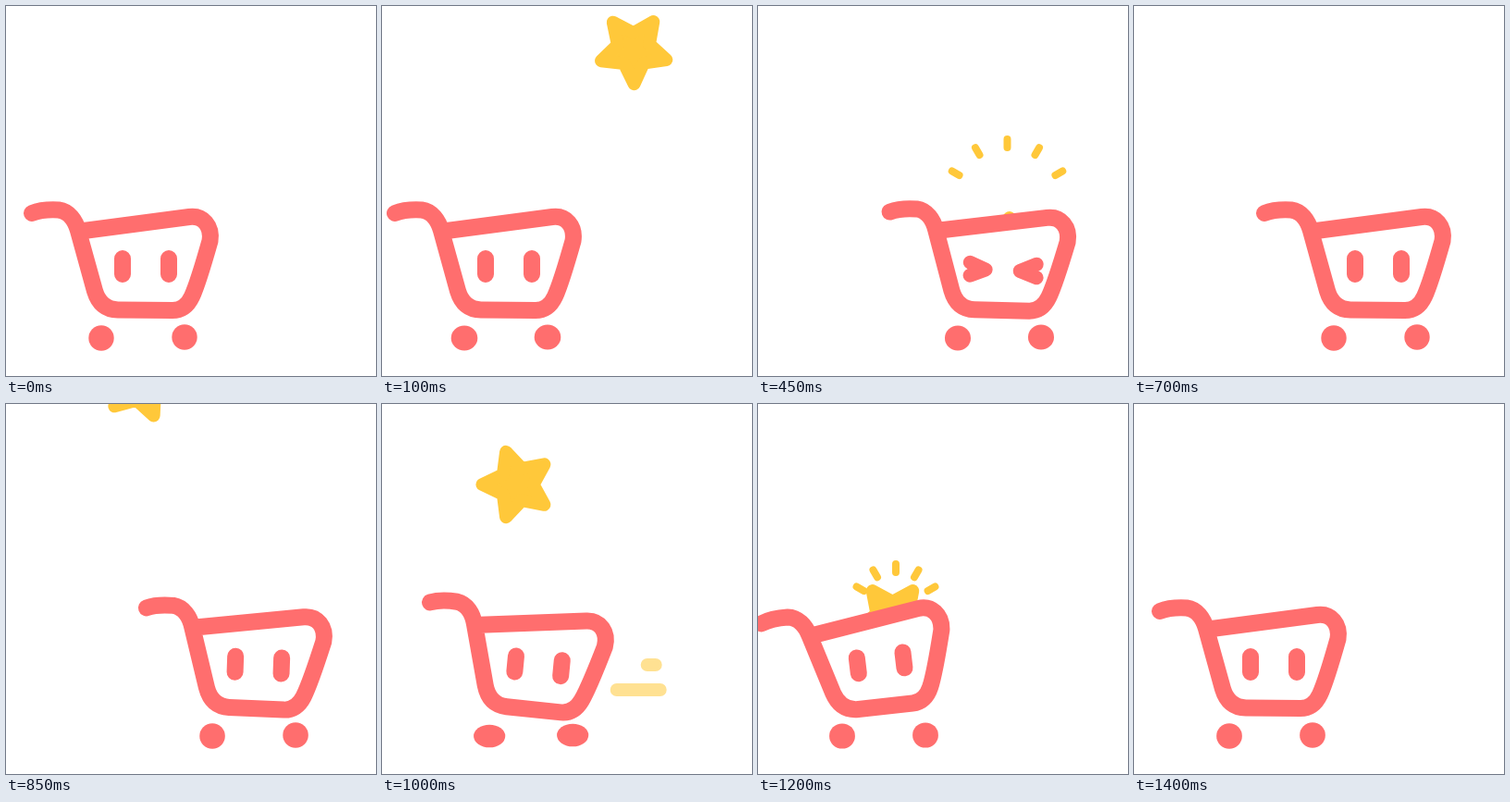
An HTML page that plays this animation: 400 by 400 pixels, repeating every 1.55 s.

```html
<!DOCTYPE html>
<html lang="en">
<head>
<meta charset="utf-8">
<title>Shopping cart</title>
<style>
  html, body { margin: 0; width: 100%; height: 100%; overflow: hidden; background: #fff; }
  svg { display: block; width: 100vw; height: 100vh; }
  .line { fill: none; stroke: #ff6e6e; stroke-width: 18; stroke-linecap: round; stroke-linejoin: round; }
  .squint { stroke-width: 15; }
  .wheel { fill: #ff6e6e; }
  .gold { fill: none; stroke: #ffc83a; stroke-width: 14; stroke-linecap: round; stroke-linejoin: round; }
  #star { fill: #ffc83a; }
  #rays { stroke-width: 8; }
</style>
</head>
<body>
<svg viewBox="0 0 400 400">
  <path id="rays" class="gold"/>
  <path id="trail" class="gold"/>
  <path id="star" class="gold"/>
  <g id="cart">
    <ellipse class="wheel" cx="103" cy="359"/>
    <ellipse class="wheel" cx="193" cy="358"/>
    <g id="body">
      <path fill="#fff" d="M78 243L96 308Q102 328 121 328.5L180 329Q194 329 201 314L220 254Q222 227 198 228Z"/>
      <path class="line" d="M28 224C38 220 48 220 57 220.5C68 222 75 232 78 243L96 308Q102 328 121 328.5L180 329Q194 329 201 314C207 301 214 277 220.5 254C223 238 213 226 198 228L84 243"/>
      <path id="open" class="line" d="M126 273V290M176 273V290"/>
      <path id="shut" class="line squint" d="M115.5 277.5L132.5 285L115.5 291.5M187.5 278.5L169.5 286L187.5 293"/>
    </g>
  </g>
</svg>
<script>
  const LOOP = 1550, STEP = 50, TURN = 700;
  const $ = id => document.getElementById(id);
  const wheels = document.querySelectorAll('.wheel');
  const clamp = v => Math.max(0, Math.min(1, v));
  const show = (id, on) => { $(id).style.display = on ? '' : 'none'; };

  // Swings from pose to pose, each a [time, value] pair, with a sine ease.
  const swing = (poses, t) => poses.reduce((v, [time, to], i) => {
    const from = i ? poses[i - 1][0] : 0;
    const p = clamp((t - from) / (time - from || 1));
    return v + (to - v) * (1 - Math.cos(Math.PI * p)) / 2;
  }, 0);

  // Each ride: wind up, dash past the goal, settle.
  const shift = t => swing([[100, -14], [250, 128], [450, 113], [TURN, 113],
    [800, 131], [1085, -17], [1400, 0]], t);
  const tilt = t => swing([[150, 0], [250, -10.3], [450, 0.8], [550, 0], [800, 0],
    [950, 8], [1140, -8], [1380, 0]], t);

  const rides = [
    { star: 272, rays: [269.5, 213], fall: 0, land: 290, angle: 22, spin: 0.31,
      trail: 'M139 305H179M142 282H147', trailFrom: 128 },
    { star: 145.5, rays: [149, 222], fall: 811, land: 1200, angle: 36, spin: 0.27,
      trail: 'M253 309H300M286 282H295', trailFrom: 12 }
  ];

  const polar = (r, deg) => {
    const a = deg * Math.PI / 180;
    return (r * Math.sin(a)).toFixed(2) + ' ' + (-r * Math.cos(a)).toFixed(2);
  };

  $('star').setAttribute('d', 'M' + Array.from({ length: 10 },
    (_, i) => polar(i % 2 ? 18 : 37, i * 36)).join('L') + 'Z');

  function drawCart(t, x, lag) {
    $('cart').setAttribute('transform', `translate(${x} 0)`);
    $('body').setAttribute('transform', `rotate(${tilt(t)} 134 334)`);
    for (const w of wheels) {
      w.setAttribute('rx', 13.7 * (1 + lag * 0.0032));
      w.setAttribute('ry', 13.7 * (1 - lag * 0.0013));
    }
    const squint = t >= 250 && t < TURN;
    show('open', !squint);
    show('shut', squint);
  }

  function drawStar(t, ride) {
    const age = t - ride.land;
    const y = Math.min(266, 232 + 282 * age / (ride.land - ride.fall));
    show('star', age < 200);
    $('star').setAttribute('transform',
      `translate(${ride.star} ${y}) rotate(${ride.angle + ride.spin * age})`);

    const r = 44.5 + 20 * Math.sin(clamp(age / 150) * Math.PI / 2);
    show('rays', age >= 0 && age < 200);
    $('rays').setAttribute('transform', `translate(${ride.rays})`);
    $('rays').setAttribute('d', [-60, -30, 0, 30, 60]
      .map(a => `M${polar(r - 4.5, a)}L${polar(r + 4.5, a)}`).join(''));
  }

  function drawTrail(x, lag, ride) {
    $('trail').setAttribute('d', ride.trail);
    $('trail').setAttribute('transform', `translate(${(x - ride.trailFrom) * 0.6} 0)`);
    $('trail').style.opacity = clamp((lag - 25) / 95);
  }

  function draw(t) {
    const ride = rides[t < TURN ? 0 : 1];
    const x = shift(t), lag = Math.abs(x - shift(t - 100));
    drawCart(t, x, lag);
    drawStar(t, ride);
    drawTrail(x, lag, ride);
  }

  const start = performance.now();
  function tick() {
    const t = (performance.now() - start) % LOOP;
    draw(Math.min(Math.floor(t / STEP) * STEP, 1400));
    requestAnimationFrame(tick);
  }
  tick();
</script>
</body>
</html>
```
